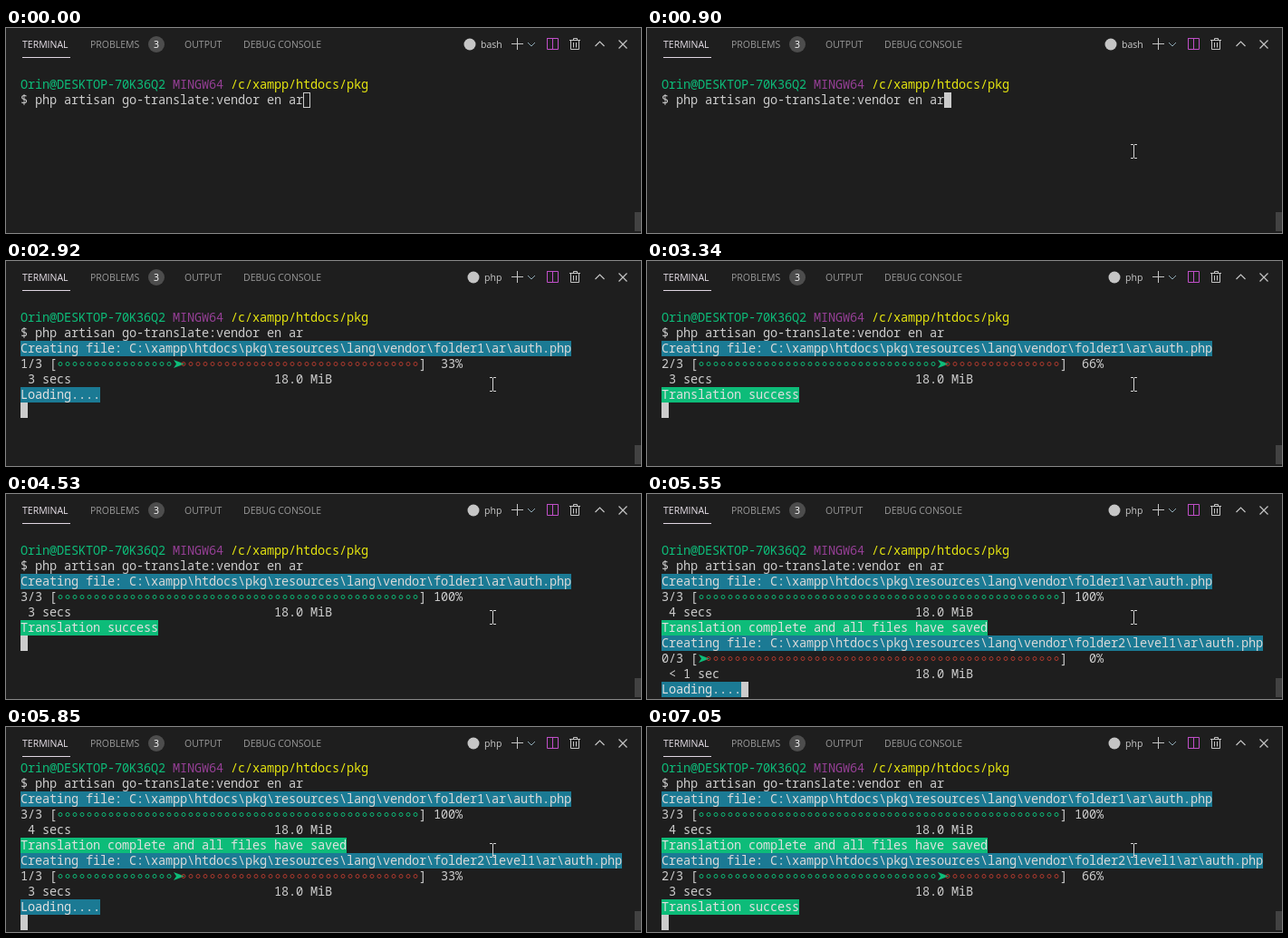
Write an HTML page with a canvas that moves like this. It is 701 px wide and 226 px high and loops after 8 s.

```html
<!DOCTYPE html>
<html lang="en">
<head>
<meta charset="utf-8">
<title>Terminal</title>
<style>
  html, body { margin: 0; width: 100%; height: 100%; overflow: hidden; background: #1e1e1e; }
  canvas { display: block; }
</style>
</head>
<body>
<canvas id="stage" width="701" height="226"></canvas>
<script>
const ctx = document.getElementById('stage').getContext('2d');
const LOOP = 8000;
const CELL = 8, LINE = 17, LEFT = 16;
const BG = '#1e1e1e', FG = '#cccccc', GREEN = '#0dbc79', RED = '#b03a2e';
const CYAN = '#1b7a94', PURPLE = '#953f95', YELLOW = '#e5e510';
const MONO = '13.6px "Noto Sans Mono", "DejaVu Sans Mono", monospace';
const UI = '10.5px "Open Sans", "Noto Sans", sans-serif';

function line(color, width, ...paths) {
  ctx.strokeStyle = color;
  ctx.lineWidth = width;
  ctx.beginPath();
  for (const p of paths) {
    ctx.moveTo(p[0], p[1]);
    for (let i = 2; i < p.length; i += 2) ctx.lineTo(p[i], p[i + 1]);
  }
  ctx.stroke();
}

function disc(x, y, r, color) {
  ctx.fillStyle = color;
  ctx.beginPath();
  ctx.arc(x, y, r, 0, Math.PI * 2);
  ctx.fill();
}

function label(text, x, color) {
  ctx.font = UI;
  ctx.fillStyle = color;
  ctx.fillText(text, x, 22);
}

function header(shell) {
  label('TERMINAL', 18, '#e9e2ea');
  ctx.fillStyle = '#e0d6e2';
  ctx.fillRect(18, 32, 53, 1);
  label('PROBLEMS', 93, '#999999');
  label('OUTPUT', 197, '#999999');
  label('DEBUG CONSOLE', 262, '#999999');
  disc(166, 18, 9, '#4d4d4d');
  label('3', 163, '#ffffff');

  const x = shell === 'bash' ? 524 : 528;
  disc(x - 12, 18, 6.5, '#c5c5c5');
  label(shell, x, FG);

  line('#c5c5c5', 1, [564.5, 11, 564.5, 24], [558, 17.5, 571, 17.5]);
  line('#8fa9b5', 1, [576, 16, 580, 20, 584, 16]);
  line('#c04fc8', 1, [597.5, 11.5, 609.5, 11.5, 609.5, 23.5, 597.5, 23.5, 597.5, 11], [603.5, 12, 603.5, 23]);
  line('#c5c5c5', 1,
    [622, 13.5, 634, 13.5], [626.5, 13, 626.5, 11.5, 630.5, 11.5, 630.5, 13],
    [623.5, 14, 623.5, 23.5, 632.5, 23.5, 632.5, 14],
    [626.5, 16, 626.5, 21.5], [629.5, 16, 629.5, 21.5]);
  line('#c5c5c5', 1.2, [650.5, 20, 655.5, 15, 660.5, 20]);
  line('#c5c5c5', 1.2, [676.5, 13.5, 685.5, 22.5], [685.5, 13.5, 676.5, 22.5]);
}

function glyph(ch, x, top, color) {
  const mid = top + 8.5;
  ctx.fillStyle = color;
  if (ch === '◦') {
    ctx.strokeStyle = color;
    ctx.lineWidth = 1;
    ctx.beginPath();
    ctx.arc(x + 4, mid, 2, 0, Math.PI * 2);
    ctx.stroke();
  } else if (ch === '➤') {
    ctx.beginPath();
    ctx.moveTo(x + 1, mid - 4.5);
    ctx.lineTo(x + 13, mid);
    ctx.lineTo(x + 1, mid + 4.5);
    ctx.lineTo(x + 4, mid);
    ctx.fill();
  } else if (ch !== ' ') {
    ctx.font = MONO;
    ctx.fillText(ch, x, top + 13);
  }
}

function drawRow(runs, top) {
  let x = LEFT;
  for (const [text, color = FG, back] of runs) {
    if (back) {
      ctx.fillStyle = back;
      ctx.fillRect(x, top, text.length * CELL, LINE);
    }
    for (const ch of text) {
      glyph(ch, x, top, color);
      x += CELL;
    }
  }
}

const PROMPT = [['Orin@DESKTOP-70K36Q2 ', GREEN], ['MINGW64 ', PURPLE], ['/c/xampp/htdocs/pkg', YELLOW]];
const COMMAND = [['$ php artisan go-translate:vendor en ar']];
const LOADING = ['Loading....', '#e0e0e0', CYAN];
const success = text => [text, '#e0e0e0', GREEN];
const DONE = success('Translation success');
const SAVED = success('Translation complete and all files have saved');

function job(folder, n, time, message) {
  const done = Math.floor(n * 50 / 3);
  const path = 'C:\\xampp\\htdocs\\pkg\\resources\\lang\\vendor\\' + folder + '\\ar\\auth.php';
  const percent = Math.floor(n * 100 / 3) + '%';
  return [
    [['Creating file: ' + path, '#d8d8d8', CYAN]],
    [[n + '/3 ['], ['◦'.repeat(done) + (n < 3 ? '➤' : ''), GREEN],
     ['◦'.repeat(Math.max(0, 49 - done)), RED], [']' + percent.padStart(5)]],
    [[time.padEnd(35) + '18.0 MiB']],
    [message]
  ];
}

// Terminal rows and cursor cell at time t
function screen(t) {
  const rows = [PROMPT, COMMAND];
  if (t < 1620) return { rows, row: 1, col: 39 };
  if (t < 1820) return { rows, row: 2, col: 0 };

  const first = (n, time, message) => rows.push(...job('folder1', n, time, message));
  const second = (n, time, message) => rows.push(...job('folder2\\level1', n, time, message));

  if (t < 2020) first(0, ' < 1 sec', LOADING);
  else if (t < 3340) first(1, ' 3 secs', LOADING);
  else if (t < 4530) first(2, ' 3 secs', DONE);
  else if (t < 5550) first(3, ' 3 secs', DONE);
  else first(3, ' 4 secs', SAVED);

  if (t >= 2020 && t < 2120) return { rows, row: 2, col: 0 };
  if (t < 5550) return { rows, row: 6, col: 0 };

  if (t < 5750) second(0, ' < 1 sec', LOADING);
  else if (t < 7050) second(1, ' 3 secs', LOADING);
  else second(2, ' 3 secs', DONE);

  if (t < 5650) return { rows, row: 9, col: 11 };
  return { rows, row: t >= 5750 && t < 5850 ? 6 : 10, col: 0 };
}

function drawCursor(x, top, focused, under) {
  if (!focused) {
    ctx.strokeStyle = FG;
    ctx.lineWidth = 1;
    ctx.strokeRect(x + 0.5, top + 0.5, CELL - 1, LINE - 1);
    return;
  }
  ctx.fillStyle = FG;
  ctx.fillRect(x, top, CELL, LINE);
  if (under) glyph(under, x, top, BG);
}

function drawPointer(t) {
  if (t < 300) return;
  const p = Math.min(5, Math.floor((t - 300) / 100)) / 5;
  const k = 1 - (1 - p) ** 2;
  const x = Math.round(631 - 94 * k), y = Math.round(204 - 68 * k);
  ctx.fillStyle = '#d4d4d4';
  ctx.fillRect(x, y - 7, 1, 14);
  for (const dy of [-8, 7]) {
    ctx.fillRect(x - 3, y + dy, 3, 1);
    ctx.fillRect(x + 1, y + dy, 3, 1);
  }
}

function draw(t) {
  ctx.fillStyle = BG;
  ctx.fillRect(0, 0, 701, 226);
  header(t < 2920 ? 'bash' : 'php');

  const top = t < 5650 ? 54 : 37;
  const { rows, row, col } = screen(t);
  rows.forEach((runs, i) => drawRow(runs, top + i * LINE));
  const under = col === 0 && rows[row] ? rows[row][0][0][0] : '';
  drawCursor(LEFT + col * CELL, top + row * LINE, t >= 900, under);

  ctx.fillStyle = '#424242';
  ctx.fillRect(694, 203, 7, 21);
  drawPointer(t);
}

const start = performance.now();
function tick() {
  draw((performance.now() - start) % LOOP);
  requestAnimationFrame(tick);
}
tick();
</script>
</body>
</html>
```
